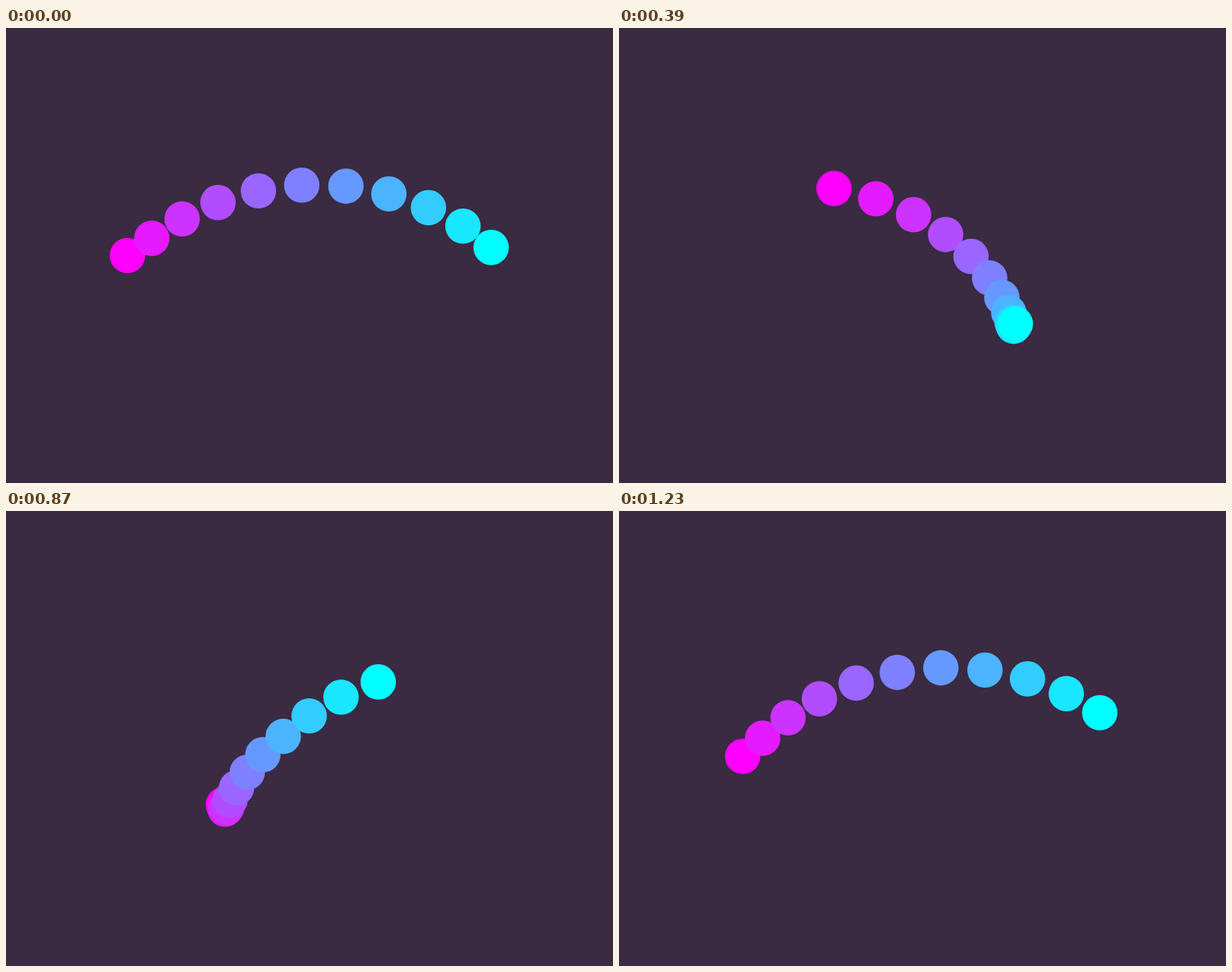
Animation of 800 by 600 pixels, one loop 1260 ms. Source, as an HTML page with a canvas:

```html
<!DOCTYPE html>
<html lang="en">
<head>
<meta charset="utf-8">
<title>Rolling beads</title>
<style>
  html, body { margin: 0; width: 100%; height: 100%; overflow: hidden; background: #3a2a42; }
  canvas { display: block; }
</style>
</head>
<body>
<canvas id="stage" width="800" height="600"></canvas>
<script>
const ctx = document.getElementById('stage').getContext('2d');

const STEP = 30;          // ms per drawn step
const STEPS = 42;         // steps per loop
const TURN = 42.67;       // steps per revolution, slightly longer than the loop
const STAGGER = 2.03;     // steps between neighbouring beads
const REST = 0.33;        // short rest at the start of a revolution
const COUNT = 11;
const SPACING = 88 / 3;
const ORBIT = 280 / 3;
const RADIUS = 70 / 3;

// Clockwise angle in degrees from the leftmost point; slower near the end of a turn.
function angleAt(steps) {
  const u = Math.max(0, (steps % TURN - REST) / TURN);
  return 360 * u + u * (1 - u) * (64 * u - 10);
}

function drawBead(i, step) {
  const a = angleAt(step + i * STAGGER) * Math.PI / 180;
  const x = 400 + (i - (COUNT - 1) / 2) * SPACING - ORBIT * Math.cos(a);
  const y = 300 - ORBIT * Math.sin(a);
  const mix = Math.round(255 * i / (COUNT - 1));
  ctx.fillStyle = `rgb(${255 - mix}, ${mix}, 255)`;
  ctx.beginPath();
  ctx.arc(x, y, RADIUS, 0, 2 * Math.PI);
  ctx.fill();
}

function draw(now) {
  const step = Math.floor(now / STEP) % STEPS;
  ctx.fillStyle = '#3a2a42';
  ctx.fillRect(0, 0, 800, 600);
  for (let i = 0; i < COUNT; i++) drawBead(i, step);
}

let start;
function tick(now) {
  start ??= now;
  draw(now - start);
  requestAnimationFrame(tick);
}
draw(0);
requestAnimationFrame(tick);
</script>
</body>
</html>
```
